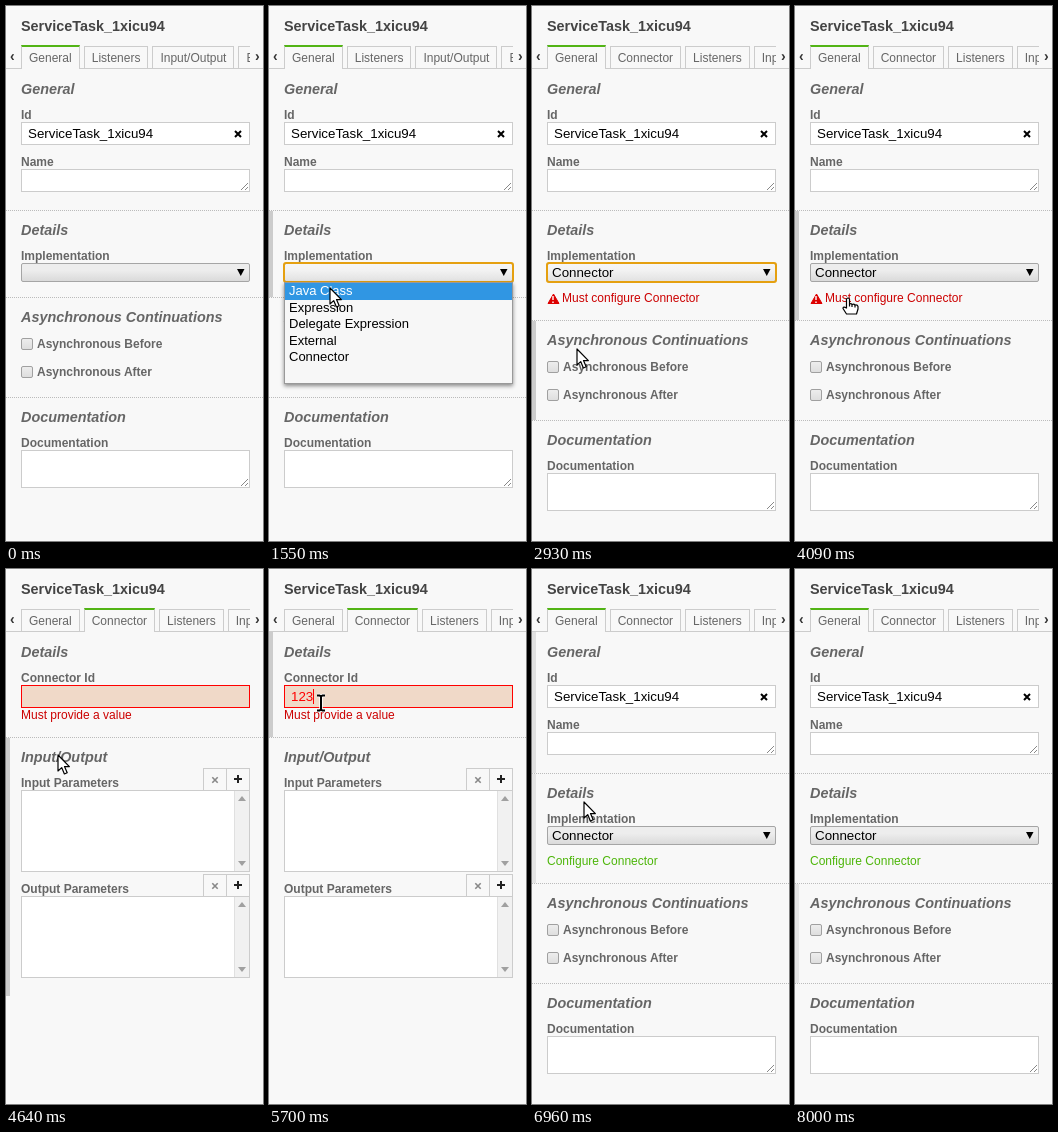
Recreate the animation shown at these times as an HTML page. Size 257x535 px, loop 9.71 s.

```html
<!DOCTYPE html>
<html lang="en">
<head>
<meta charset="utf-8">
<title>Properties panel</title>
<style>
html, body { margin: 0; width: 100%; height: 100%; overflow: hidden; background: #f8f8f8; }
body { position: relative; font-family: "Liberation Sans", Arial, sans-serif; color: #666; }
div, p, svg { position: absolute; box-sizing: border-box; margin: 0; white-space: pre; }
svg { width: 1px; height: 1px; overflow: visible; fill: none; }
.field { background: #fff; border: 1px solid #ccc; }
.tabs { left: 15px; top: 39px; width: 229px; height: 24px; overflow: hidden; display: flex; }
.tabs span { flex: none; box-sizing: border-box; height: 22px; margin: 1px 4px 0 0; padding: 4px 7px 0;
  border: 1px solid #ccc; border-bottom: 0; background: #f8f8f8; font-size: 12px; line-height: 14px; }
.tabs .on { height: 24px; margin-top: 0; border-top: 2px solid #52b415; }
.caret { border-left: 1px solid; }
</style>
</head>
<body>
<div id="stage"></div>
<script>
const LOOP = 9710;
const OPEN = 1350, CHOOSE = 2350, RELAYOUT = 2430, BLUR = 4090,
      TO_CONNECTOR = 4170, FOCUS = 4930, VALID = 5740, TO_GENERAL = 6440,
      ENTER = 750, LEAVE = 7920, SETTLED = 8000;
const TYPED = [5160, 5270, 5390];
const OPTIONS = ['Java Class', 'Expression', 'Delegate Expression', 'External', 'Connector'];

// pointer waypoints: time, x, y
const PATH = [
  [750, 70, 323], [1030, 62, 266], [1350, 62, 266], [1550, 61, 281], [1910, 45, 343],
  [2930, 45, 343], [3300, 15, 325], [3730, 53, 292], [4170, 53, 292], [4930, 51, 134],
  [6000, 51, 134], [6360, 44, 54], [6500, 44, 54], [6960, 51, 232],
  [7450, 62, 268], [7760, 34, 296], [7920, 8, 378]
];

const within = (t, a, b) => t >= a && t < b;
const onConnector = t => within(t, TO_CONNECTOR, TO_GENERAL);
const isOpen = t => within(t, OPEN, CHOOSE);

function pointer(t) {
  if (!within(t, ENTER, LEAVE)) return null;
  const i = PATH.findIndex(p => p[0] > t);
  const [t0, x0, y0] = PATH[i - 1], [t1, x1, y1] = PATH[i];
  const u = (t - t0) / (t1 - t0), e = u * u * (3 - 2 * u);
  return [x0 + (x1 - x0) * e, y0 + (y1 - y0) * e];
}

function groupEdges(t) {
  if (onConnector(t)) return [62, t < VALID ? 168 : 154, 427];
  const d = t < RELAYOUT ? 0 : 23;
  return [62, 204, 291 + d, 391 + d, 505];
}

function hovers(i, t) {
  const p = pointer(t), edges = groupEdges(t);
  return p !== null && within(isOpen(t) ? 266 : p[1], edges[i], edges[i + 1]);
}

// linear fade: share of the last 250 ms spent over the group
function barOpacity(i, t) {
  if (t >= SETTLED) {
    if (i === 1) return 0;
    t = SETTLED;
  }
  let n = 0;
  for (let k = 0; k < 25; k++) {
    const s = t - k * 10;
    if (onConnector(s) === onConnector(t) && hovers(i, s)) n++;
  }
  return n / 25;
}

const box = (x, y, w, h, css = '', cls = '') =>
  `<div class="${cls}" style="left:${x}px;top:${y}px;width:${w}px;height:${h}px;${css}"></div>`;
const field = (y, h, css) => box(15, y, 229, h, css, 'field');
const shape = (x, y, d, attrs) =>
  `<svg style="left:${x}px;top:${y}px"><path d="${d}" ${attrs}/></svg>`;

function text(x, base, str, size = 12, css = '') {
  const up = Math.round(size * 0.905), line = up + Math.round(size * 0.212);
  return `<p style="left:${x}px;top:${base - up}px;font-size:${size}px;line-height:${line}px;${css}">${str}</p>`;
}
const label = (x, base, str) => text(x, base, str, 12, 'font-weight:bold');
const heading = (base, str) => text(15, base, str, 14.4, 'font-weight:bold;font-style:italic');

const textarea = (y, h) => field(y, h) +
  shape(235, y + h - 9, 'M0 7L7 0M4 7L7 4', 'stroke="#888"');
const cross = (x, y, r, color, w) =>
  shape(x, y, `M${-r} ${-r}L${r} ${r}M${r} ${-r}L${-r} ${r}`, `stroke="${color}" stroke-width="${w}"`);
const checkbox = (y, str) =>
  box(15, y, 12, 12, 'border:1px solid #a0a0a0;border-radius:2px;background:linear-gradient(#ededed,#dedede)') +
  label(31, y + 10, str);

const tabs = (names, active) => box(0, 62, 257, 1, 'background:#ccc') +
  '<div class="tabs">' +
  names.map((n, i) => `<span class="${i === active ? 'on' : ''}">${n}</span>`).join('') + '</div>' +
  text(4, 55, '‹', 14, 'font-weight:bold;color:#333') +
  text(249, 55, '›', 14, 'font-weight:bold;color:#333');

function select(t, p) {
  const hover = p && within(p[1], 257, 276) || within(t, OPEN, BLUR);
  const tones = hover ? '#f6f6f6,#f2f2f2 38%,#e2e2e2' : '#ededed,#ededed 38%,#dadada';
  const ring = within(t, OPEN, BLUR) ? 'outline:2px solid #e5a010;outline-offset:-1px;' : '';
  return box(15, 257, 229, 19, `border:1px solid #a5a5a5;border-radius:2px;background:linear-gradient(${tones});${ring}`) +
    shape(230.5, 263, 'M0 0H7.5L3.75 7Z', 'fill="#000"') +
    (t < CHOOSE ? '' : text(20, 271, 'Connector', 13.33, 'color:#000'));
}

function popup(p) {
  const hit = Math.floor((p[1] - 276.5) / 16.5);
  let out = box(15, 276, 229, 102, 'background:#f7f7f7;border:1px solid #999;box-shadow:0 2px 4px rgba(0,0,0,.45)');
  OPTIONS.forEach((o, i) => {
    const y = 276.5 + i * 16.5;
    if (i === hit) out += box(16, Math.round(y), 227, 17, 'background:#3096e3');
    out += text(20, Math.round(y + 12.5), o, 13, `color:${i === hit ? '#fff' : '#000'}`);
  });
  return out;
}

function status(t) {
  if (t < RELAYOUT) return '';
  if (t >= TO_GENERAL) return text(15, 296, 'Configure Connector', 12, 'color:#4db60a');
  return shape(15.5, 287.5, 'M0 9.5L5.5 0L11 9.5Z', 'fill="#d00" stroke="#d00" stroke-linejoin="round"') +
    shape(21, 290, 'M0 0V4M0 5.5V7', 'stroke="#fff" stroke-width="1.4"') +
    text(30, 296, 'Must configure Connector', 12, 'color:#c00');
}

function generalView(t, p) {
  const d = t < RELAYOUT ? 0 : 23;
  const names = d ? ['General', 'Connector', 'Listeners', 'Input/Output']
                  : ['General', 'Listeners', 'Input/Output', 'Extensions'];
  return tabs(names, 0) +
    heading(88, 'General') +
    label(15, 113, 'Id') + field(116, 23) +
    text(22, 132, 'ServiceTask_1xicu94', 13.33, 'color:#000') + cross(232, 127.5, 3, '#000', 2) +
    label(15, 160, 'Name') + textarea(163, 23) +
    heading(229, 'Details') + label(15, 254, 'Implementation') + select(t, p) + status(t) +
    heading(316 + d, 'Asynchronous Continuations') +
    checkbox(332 + d, 'Asynchronous Before') + checkbox(360 + d, 'Asynchronous After') +
    heading(416 + d, 'Documentation') +
    label(15, 441 + d, 'Documentation') + textarea(444 + d, 38) +
    (isOpen(t) ? popup(p) : '');
}

function parameterList(y, str) {
  const button = 'border:1px solid #ccc;background:#f8f8f8';
  return label(15, y - 4, str) +
    box(197, y - 23, 24, 23, button) + cross(208.5, y - 11, 2.7, '#888', 1.6) +
    box(220, y - 23, 24, 23, button) +
    shape(232, y - 12, 'M-4 0H4M0 -4V4', 'stroke="#222" stroke-width="2"') +
    field(y - 1, 82) + box(228, y, 15, 80, 'background:#f1f1f1;border-left:1px solid #e0e0e0') +
    shape(235.5, y + 7, 'M-4 3H4L0 -2Z', 'fill="#a0a0a0"') +
    shape(235.5, y + 73, 'M-4 -3H4L0 2Z', 'fill="#a0a0a0"');
}

function connectorView(t) {
  const bad = t < VALID, d = bad ? 0 : -14;
  const value = '123'.slice(0, TYPED.filter(at => t >= at).length);
  const caret = t >= FOCUS ? '<span class="caret"></span>' : '';
  return tabs(['General', 'Connector', 'Listeners', 'Input/Output'], 1) +
    heading(88, 'Details') + label(15, 113, 'Connector Id') +
    field(116, 23, bad ? 'border-color:#f00;background:#f0d9c8' : '') +
    text(22, 132, value + caret, 13.33, `color:${bad ? '#f00' : '#000'}`) +
    (bad ? text(15, 150, 'Must provide a value', 12, 'color:#c00') : '') +
    heading(193 + d, 'Input/Output') +
    parameterList(222 + d, 'Input Parameters') + parameterList(328 + d, 'Output Parameters');
}

function groups(t) {
  const edges = groupEdges(t);
  return edges.slice(0, -1).map((y, i) =>
    (i ? box(0, y, 257, 1, 'border-top:1px dotted #bbb') : '') +
    box(0, y + 1, 4, edges[i + 1] - y - 1, `background:#ccc;opacity:${barOpacity(i, t)}`)
  ).join('');
}

function cursor(t, [x, y]) {
  const general = !onConnector(t);
  const overLink = general && within(t, RELAYOUT, TO_CONNECTOR) && within(y, 286, 299) && x > 28;
  const overField = within(y, 116, 139) || general && within(y, 163, 186);
  const ink = 'stroke="#000" stroke-width="1.2" stroke-linejoin="round"';
  if (overLink || within(y, 39, 62)) {
    return shape(x, y, 'M-1.5 1Q0 -1 1.5 1V6Q3 5 4 6.5Q6 5.5 7 7Q9.5 6.5 10 8.5V11L8.5 16H-1.5L-5 10.5Q-5 8 -1.5 10Z',
      `fill="#fff" ${ink}`) + shape(x, y, 'M1.5 6V8.5M4 6.5V9M7 7V9.5', ink);
  }
  if (overField) {
    const bar = 'M-4 -7.5H-1.5Q0 -7 0 -6Q0 -7 1.5 -7.5H4M0 -6V6M-4 7.5H-1.5Q0 7 0 6Q0 7 1.5 7.5H4';
    return shape(x + 0.5, y, bar, 'stroke="#fff" stroke-width="3.5"') +
      shape(x + 0.5, y, bar, 'stroke="#000" stroke-width="2"');
  }
  return shape(x + 0.5, y + 0.5, 'M0 0V16L3.7 12.6L6.4 19L9.2 17.8L6.5 11.6H11.4Z', `fill="#fff" ${ink}`);
}

function scene(t) {
  const p = pointer(t);
  return text(15, 25, 'ServiceTask_1xicu94', 14.4, 'font-weight:bold;color:#444') +
    groups(t) + (onConnector(t) ? connectorView(t) : generalView(t, p)) +
    (p ? cursor(t, p) : '');
}

const stage = document.getElementById('stage');
const start = performance.now();
let shown = '';
function draw() {
  const html = scene((performance.now() - start) % LOOP);
  if (html !== shown) stage.innerHTML = shown = html;
  requestAnimationFrame(draw);
}
draw();
</script>
</body>
</html>
```
